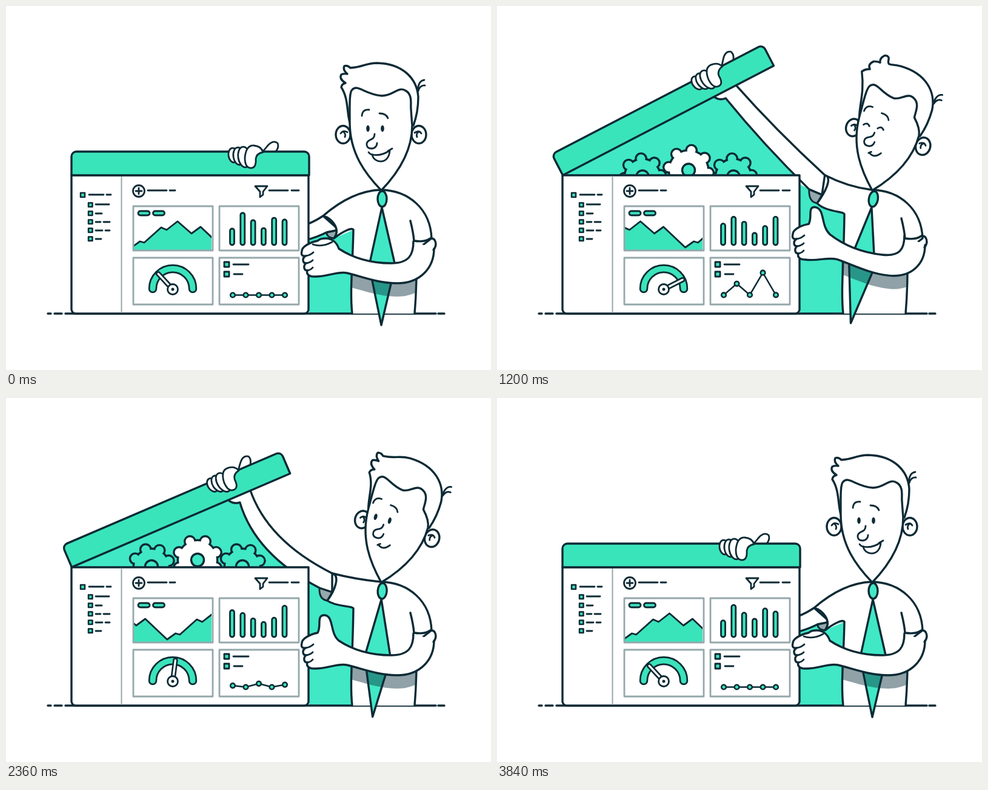
Write an HTML page with a canvas that moves like this. It is 800 by 600 pixels and loops after 3.88 s.

```html
<!DOCTYPE html>
<html lang="en">
<head>
<meta charset="utf-8">
<title>Dashboard box</title>
<style>
html, body { margin: 0; width: 100%; height: 100%; overflow: hidden; background: #fff; }
canvas { display: block; }
</style>
</head>
<body>
<canvas id="stage" width="800" height="600"></canvas>
<script>
const ctx = document.getElementById('stage').getContext('2d');
const LOOP = 3880, CYCLE = LOOP / 2;
const INK = '#0c2a35', GREEN = '#3ae4ba', BRIGHT = '#40e8c6', WHITE = '#fff', GREY = '#95a8ab';
const BOLD = 3.4, THIN = 2.8, DEG = Math.PI / 180;

const clamp = x => Math.max(0, Math.min(1, x));
const span = (t, from, to) => clamp((t - from) / (to - from));
const ramp = (t, from, to) => (1 - Math.cos(Math.PI * span(t, from, to))) / 2;
const bump = (t, from, to) => Math.sin(Math.PI * span(t, from, to)) ** 2;
const blend = (a, b, p) => a.map((v, i) => v + (b[i] - v) * p);

// Motion of each part over the loop.
const lidAngle = t => 23.2 * (ramp(t, 740, 1200) - ramp(t, 3220, 3600)) + 4.2 * bump(t, 880, 1520);
const headAngle = t => 15 * ramp(t, 740, 1180) - 5 * ramp(t, 1260, 1600) + 5 * ramp(t, 1900, 2240) -
  6 * ramp(t, 2800, 3060) - 9 * ramp(t, 3320, 3580);
const tieAngle = t => 9.3 * (headAngle(t - 240) - headAngle(t - 260));
const gearSink = t => 50 * (1 - ramp(t, 720, 1300) + ramp(t, 3220, 3440));
const handLift = t => bump(t, 900, 1500);
const thumbUp = t => ramp(t, 880, 1150) - ramp(t, 3320, 3560);
const lockBlow = t => bump(t, 950, 1450);

function draw(d, fill, stroke = INK, width = BOLD) {
  const path = typeof d === 'string' ? new Path2D(d) : d;
  if (fill) { ctx.fillStyle = fill; ctx.fill(path); }
  if (stroke) { ctx.strokeStyle = stroke; ctx.lineWidth = width; ctx.stroke(path); }
}

function oval(x, y, rx, ry, fill, width = BOLD, turn = 0) {
  const p = new Path2D();
  p.ellipse(x, y, rx, ry, turn, 0, 7);
  draw(p, fill, width ? INK : null, width);
}

function box(x, y, w, h, r, fill, stroke = INK, width = THIN) {
  const p = new Path2D();
  p.roundRect(x, y, w, h, r);
  draw(p, fill, stroke, width);
}

function layer(paint) {
  ctx.save();
  paint();
  ctx.restore();
}

function clipped(x, y, w, h, paint) {
  layer(() => {
    ctx.beginPath();
    ctx.rect(x, y, w, h);
    ctx.clip();
    paint();
  });
}

function turned(x, y, degrees, paint) {
  layer(() => {
    ctx.translate(x, y);
    ctx.rotate(degrees * DEG);
    ctx.translate(-x, -y);
    paint();
  });
}

// Outlines first, then fills, so that body and teeth merge into one shape.
function gear(x, y, r, phase, fill) {
  for (const width of [2 * BOLD, 0]) {
    oval(x, y, r, r, fill, width);
    for (let i = 0; i < 8; i++) {
      const a = (phase + 45 * i) * DEG;
      oval(x + (r + 2) * Math.cos(a), y + (r + 2) * Math.sin(a), 7, 7, fill, width);
    }
  }
  oval(x, y, 10.5, 10.5, BRIGHT);
}

function gears(t) {
  const sink = gearSink(t), turn = 0.104 * (t - 1880);
  for (const x of [240, 390]) gear(x, 278 + sink, 28, turn - 114, BRIGHT);
  gear(316, 267 + sink, 31, -turn - 107.5, WHITE);
}

function armPose(lid) {
  const open = lid / 23.2;
  return {
    cuff: blend([523, 346], [538, 289], open),
    under: blend([541, 383], [530, 334], open),
    inner: blend([529, 373], [517, 313], open),
    shoulder: blend([570, 305], [577, 299], open),
    pit: 369 - 22 * open
  };
}

function boxInside(t, lid) {
  const c = Math.cos(lid * DEG), s = Math.sin(lid * DEG);
  const onLid = (x, y) => [108 + x * c + y * s, 278 - x * s + y * c];
  const sag = 28 - lid;
  const bow = (a, b) => [(a[0] + b[0]) / 2 - 40 * clamp(sag / 4), (a[1] + b[1]) / 2 + 3.3 * sag];
  const { cuff, under, inner, pit } = armPose(lid);
  const [ux, uy] = under, [ix, iy] = inner;
  const palm = onLid(280, -2), heel = onLid(284, 11), wrist = onLid(297, 12), top = onLid(321, -3);
  const low = bow(wrist, inner), high = bow(top, cuff);

  clipped(0, 0, 500, 300, () =>
    draw(`M108 278L${palm}Q${heel} ${wrist}Q${low} ${inner}L500 300H108Z`, BRIGHT, null));
  clipped(108, 200, 392, 80, () => gears(t));
  draw(`M500 ${iy - 8}L${inner}L${under}L573 ${pit}V507H500Z`, BRIGHT, null);
  draw(`M${inner}Q${ix - 1} ${uy - 2} ${under}L${ux + 8} ${uy - 14}Z`, GREY, INK, THIN);
  draw(`M${top}Q${high} ${cuff}L${ux + 8} ${uy - 14}L${inner}Q${low} ${wrist}Q${heel} ${palm}`, WHITE);
}

function lidAndHand(lid) {
  turned(108, 278, -lid, () => {
    draw('M418 246Q424 240 431 231Q440 220 448 226Q452 236 438 246', WHITE, INK, THIN);
    box(108, 240, 392, 39, [8, 8, 0, 0], GREEN, INK, BOLD);
    for (let i = 0; i < 3; i++) oval(375 + 9 * i, 246 + 1.5 * i, 8 + i, 12 + 2.5 * i, WHITE, THIN, -.15);
    draw('M394 250Q396 229 409 230Q421 231 424 241Q413 243 412 252Q413 268 403 267Q394 266 394 250Z', WHITE, INK, THIN);
  });
}

function areaChart(t) {
  const hills = [[0, 398], [14, 388], [21, 390], [49, 365], [58, 369], [76, 355], [99, 375], [114, 364]];
  const period = 150, shift = 357 - period * t / LOOP;
  clipped(211, 330, 128, 73, () => {
    const line = new Path2D();
    for (let n = -2; n < 2; n++) {
      for (const [x, y] of hills) line.lineTo(shift + n * period + x, y);
    }
    const area = new Path2D(line);
    area.lineTo(700, 410);
    area.lineTo(0, 410);
    draw(area, GREEN, null);
    draw(line, null, INK, THIN);
  });
  for (const x of [218, 242.5]) box(x, 338, 19, 7, 3.5, GREEN);
}

function barChart(u) {
  const phase = 4 * Math.PI * u / CYCLE;
  // Middle height, then cosine and sine swing of each bar.
  const bars = [[358, 9, 0], [348, -7, 0], [359, -6, -3], [366, 0, 8], [354, -5, 9], [347, 5, 0]];
  bars.forEach(([mid, a, b], i) => {
    const y = mid + a * Math.cos(phase) + b * Math.sin(phase);
    box(369.5 + 17.3 * i, y, 7, 394 - y, 3.5, GREEN);
  });
}

function gauge(u) {
  const band = 'M242 466A33 33 0 0 1 308 466', needle = 'M275 467V432';
  draw(band, null, INK, 14.5);
  draw(band, null, GREEN, 9);
  turned(275, 467, -43 + 106 * (ramp(u, 160, 700) - ramp(u, 1200, 1640)), () => {
    draw(needle, null, INK, 8.5);
    draw(needle, null, WHITE, 3.2);
  });
  oval(275, 467, 8.5, 8.5, WHITE, THIN);
  oval(275, 467, 2.5, 2.5, INK, 0);
}

function lineChart(u) {
  const even = bump(u, 380, 690) + bump(u, 1190, 1600), odd = bump(u, 655, 1410);
  const points = [15, 32, 35, 63, 24].map((rise, i) => [374 + 21.5 * i, 476.5 - rise * (i % 2 ? odd : even)]);
  draw('M' + points.join('L'), null, INK, 2.5);
  for (const [x, y] of points) oval(x, y, 3.8, 3.8, GREEN, 2.6);
  for (const y of [426, 442]) box(360, y - 4, 8, 8, 0, GREEN);
  draw('M375 426H400M376 442H390', null, INK, THIN);
}

function panel(t) {
  box(108, 279, 391, 228, [0, 0, 7, 7], WHITE, INK, BOLD);
  draw('M190.500 281V505', null, GREY, 2);
  box(123, 308, 7, 7, 0, GREEN, INK, 2.5);
  for (let y = 328; y < 390; y += 14) box(136, y - 3.5, 6.5, 6.5, 0, GREEN, INK, 2.5);
  draw('M137 311H161M166 311H173M148 327H170M148 342H158M148 356H156M161 356H171M148 370H159M164 370H171M148 384H157', null, INK, THIN);

  oval(219, 305, 9.5, 9.5, WHITE, THIN);
  draw('M214 305H224M219 300V310M234 304H265M270 304H279M434 304H465M471 304H483', null, INK, THIN);
  draw('M411 297H431L424 306V311L419 315V306Z', WHITE, INK, THIN);

  areaChart(t);
  const u = t % CYCLE;
  barChart(u);
  gauge(u);
  lineChart(u);
  for (const x of [210, 352]) {
    box(x, 330, 131, 73, 0, null, GREY);
    box(x, 415, 131, 77, 0, null, GREY);
  }
}

function frontArm(t) {
  const lift = handLift(t), m = thumbUp(t);
  const arm = new Path2D();
  // Raises points more the nearer they are to the hand.
  const raise = ([x, y]) => [x, y - 28 * lift * clamp((760 - x) / 250)];
  const curve = (a, b, c) => arm.bezierCurveTo(...raise(a), ...raise(b), ...raise(c));
  const tip = blend([528, 383], [526, 358], m);

  arm.moveTo(...raise([672, 388]));
  curve([672, 410], [665, 424], [635, 424]);
  curve([600, 424], [570, 414], [549, 400]);
  curve(blend([545, 388], [534, 388], m), blend([536, 383], [541, 360], m), tip);
  curve(blend([520, 383], [511, 357], m), blend([518, 384], [521, 376], m), [514, 387]);
  curve([500, 390], [488, 397], [488, 404]);
  curve([486, 411], [490, 413], [494, 412]);
  curve([488, 416], [489, 424], [495, 424]);
  curve([490, 428], [491, 436], [497, 436]);
  curve([495, 442], [500, 446], [508, 446]);
  curve([530, 447], [545, 437], [562, 440]);
  curve([590, 447], [615, 457], [645, 457]);
  curve([685, 457], [706, 430], [706, 400]);

  layer(() => {
    ctx.clip(new Path2D('M568 410H677V506H570Z'));
    ctx.translate(0, 22);
    draw(arm, 'rgba(10,50,60,.45)', null);
  });
  draw(arm, WHITE);
  layer(() => {
    ctx.translate(0, -28 * lift);
    draw('M494 412Q502 411 507 406M495 424Q502 423 506 419M497 436Q503 435 506 431', null, INK, THIN);
    if (m < .5) draw('M506 393Q522 398 538 389', null, INK, THIN);
  });
  layer(() => {
    ctx.translate(0, -4 * lift);
    draw('M667 354Q672 374 673 387C685 389 693 388 700 383C709 382 712 394 705 402');
  });
}

function body(t, lid) {
  const { cuff, under, shoulder, pit } = armPose(lid);
  const [cx, cy] = cuff, [ux, uy] = under;
  draw(`M571 507C567 470 572 425 573 ${pit}C571 ${pit - 5} ${ux + 14} ${uy + (pit - uy) * .8} ${under}` +
    `C${ux + 12} ${uy - 16} ${cx + 14} ${cy + 4} ${cuff}Q${shoulder} 618 303` +
    'C665 304 700 335 702 383L677 402Q678 460 674 507', WHITE);
  turned(620, 320, tieAngle(t), () => {
    draw('M620 332L599 428L619 526L642 428Z', BRIGHT);
    oval(620.5, 318, 7.5, 13, BRIGHT);
  });
  frontArm(t);
}

function eyes(t) {
  draw('M587 181Q588 170 599 171M616 177Q627 177 630 185', null, INK, THIN);
  for (const x of [597, 621]) {
    if (t > 1080 && t < 1970) draw(`M${x - 5} 203Q${x} 197 ${x + 5} 203`, null, INK, THIN);
    else oval(x, 202, 2.8, 5.4, INK, 0);
  }
}

function noseAndMouth(t) {
  draw('M608 211C608 217 605 219 600 221C592 225 594 235 603 235C609 235 612 230 612 226', null, INK, THIN);
  if (t > 1040 && t < 3080) {
    draw('M607 246L611 243M608 245Q618 253 627 241', null, INK, THIN);
  } else {
    draw('M604 245C607 260 632 262 633 238Q619 248 604 245Z', WHITE, INK, THIN);
    draw('M598 241Q601 245 605 245M630 239L637 235', null, INK, THIN);
  }
}

function head(t) {
  const angle = headAngle(t), w = lockBlow(t);
  const k = angle / 15, s = -13 * k;
  // The front lock leans right and up, its tips most.
  const lock = (x, y) => `${x + w * (132 - y) * .7} ${y - 15 * w}`;
  turned(619, 304, angle, () => {
    oval(556 + 6 * k, 212, 12, 14.5, WHITE);
    oval(681, 212, 12, 14.5, WHITE);
    layer(() => {
      ctx.translate(6 * k, 0);
      draw('M552 210Q556 204 563 208M557 208Q561 211 559 216', null, INK, THIN);
    });
    draw('M685 210Q681 204 674 209M680 208Q676 211 678 216', null, INK, THIN);
    draw('M679 140Q680 123 690 122M680 140Q683 130 691 131', null, INK, THIN);
    draw(`M567 192C562 175 565 152 ${lock(553, 134)}Q${lock(554, 128)} ${lock(560, 127)}` +
      `Q${lock(549, 120)} ${lock(553, 113)}Q${lock(558, 111)} ${lock(563, 112)}` +
      `Q${lock(555, 105)} ${lock(558, 99)}Q${lock(563, 97)} ${lock(568, 102)}` +
      'C590 101 592 94 612 94C655 95 678 120 680 150Q680 175 672 197', WHITE);
    draw(`M567 192C567 165 566 142 571 138C580 128 592 146 ${620 + s / 2} 148` +
      `C${640 + s} 148 ${647 + s} 131 ${660 + s} 140C${671 + s} 147 ${667 + s} 162 ${668 + s} 170Q669 185 670 197` +
      'C670 240 645 277 619 304C593 277 567 243 567 192Z', WHITE);
    ctx.translate(-10 * k, 0);
    noseAndMouth(t);
    ctx.translate(-5 * k, 0);
    eyes(t);
  });
}

function frame(now) {
  const t = now % LOOP, lid = lidAngle(t);
  ctx.fillStyle = WHITE;
  ctx.fillRect(0, 0, 800, 600);
  ctx.lineCap = ctx.lineJoin = 'round';
  boxInside(t, lid);
  draw('M69 507H74M80 507H92M98 507H709M713 507H723');
  panel(t);
  lidAndHand(lid);
  body(t, lid);
  head(t);
  requestAnimationFrame(frame);
}

requestAnimationFrame(frame);
</script>
</body>
</html>
```
